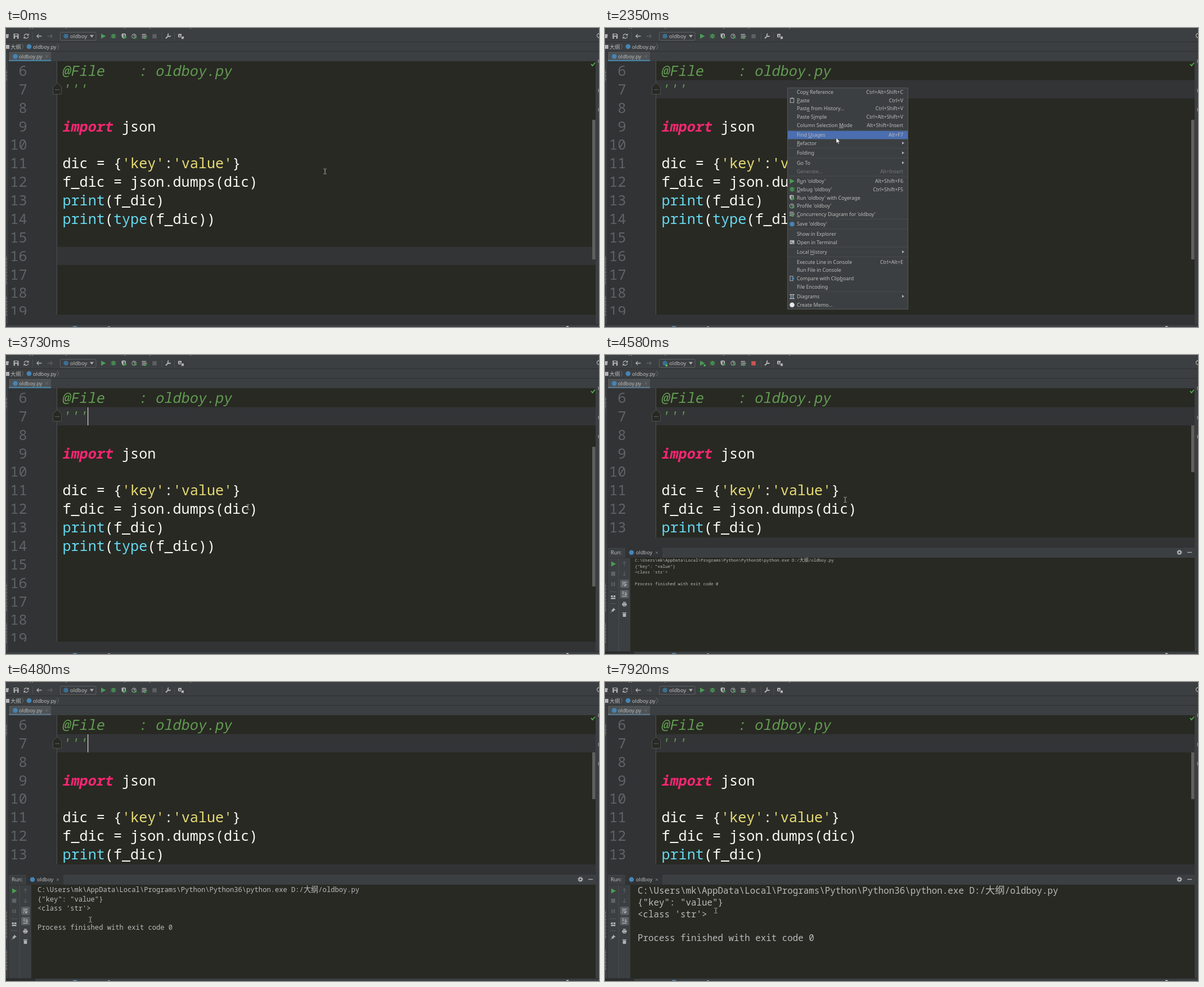
An HTML page for the animation above (8 s loop, 1054x531 px).

```html
<!DOCTYPE html>
<html lang="en">
<head>
<meta charset="utf-8">
<style>
html, body { margin: 0; width: 100%; height: 100%; overflow: hidden; background: #3c3f41; }
svg { display: block; width: 1054px; height: 531px; }
text { white-space: pre; font: 9.2px 'Noto Sans', 'Noto Sans CJK SC', 'Noto Sans CJK', sans-serif; fill: #bbb; }
.code text { font: 25.15px 'Noto Sans Mono', monospace; fill: #f8f8f2; }
.code .num { fill: #606366; }
.code .doc { fill: #629c52; }
.code .key { fill: #f92672; font-weight: bold; }
.code .str { fill: #e6db74; }
.code .fn { fill: #66d9ef; }
.menu text { font-size: 8.9px; }
.menu .off { fill: #777; }
.mnemonic { text-decoration: underline; }
.console text { font-family: 'Noto Sans Mono', 'Noto Sans CJK SC', 'Noto Sans CJK', monospace; }
.cjk { font-size: 1.09em; }
</style>
</head>
<body>
<svg id="stage" viewBox="0 0 1054 531"></svg>
<script>
const LOOP = 8000;
const GREY = '#afb1b3', GREEN = '#499c54', RED = '#c75450', BLUE = '#4584b6';
const PANEL = '#3c3f41', DARK = '#313335', EDITOR = '#282923';

const esc = s => s.replace(/&/g, '&amp;').replace(/</g, '&lt;');
const rect = (x, y, w, h, fill, more = '') =>
  `<rect x="${x}" y="${y}" width="${w}" height="${h}" fill="${fill}" ${more}/>`;
const text = (x, y, s, more = '') => `<text x="${x}" y="${y}" ${more}>${esc(s)}</text>`;
const line = (d, color = GREY, w = 1) => `<path d="${d}" fill="none" stroke="${color}" stroke-width="${w}"/>`;
const fill = (d, color = GREY) => `<path d="${d}" fill="${color}"/>`;
const dot = (x, y, r, color) => `<circle cx="${x}" cy="${y}" r="${r}" fill="${color}"/>`;
const group = (id, body, more = '') => `<g id="${id}" ${more}>${body}</g>`;

// Each icon is drawn around its own centre.
const shapes = {
  play: c => fill('M-4-4.5L4.5 0L-4 4.5Z', c),
  bug: c => `<ellipse rx="2.7" ry="4" fill="${c}"/>` +
    line('M-4.5-3L4.5 3M4.5-3L-4.5 3M-4.5 0H4.5', c) + line('M-2-.8H2M-2 1.4H2', PANEL, .6),
  shield: c => fill('M-4.5-4L-1-5L3-4V0Q2 3-1 4.5Q-4 3-4.5 0Z', c) +
    fill('M-1-3H1V3H-1Z', PANEL) + fill('M0-1L5 2L0 5Z', GREEN),
  clock: c => `<circle cx="-.5" r="3.8" fill="none" stroke="${c}"/>` +
    line('M-.5-3V0L2-1.5', c) + fill('M0 0L5 2.5L0 5Z', GREEN),
  lanes: c => line('M-4.5-3.5H3M-4.5-.5H4.5M-4.5 2.5H0', c, 1.4) + fill('M0 0L5 2.5L0 5Z', GREEN),
  stop: c => rect(-3.7, -3.7, 7.4, 7.4, c),
  pause: c => rect(-3, -3.5, 2, 7, c) + rect(1, -3.5, 2, 7, c),
  save: c => fill('M-4.5-4.5H3L4.5-3V4.5H-4.5Z', c) + rect(-2.5, -3.5, 5, 2.5, PANEL) + rect(-2, 1, 4, 3.5, PANEL),
  sync: c => line('M-3.7-.5A3.8 3.8 0 0 1 3-2.5M3.7.5A3.8 3.8 0 0 1-3 2.5', c, 1.3) +
    fill('M4.5-5V-1H.8ZM-4.5 5V1H-.8Z', c),
  left: c => line('M4.5 0H-4M-.8-3.4L-4.2 0L-.8 3.4', c, 1.3),
  right: c => line('M-4.5 0H4M.8-3.4L4.2 0L.8 3.4', c, 1.3),
  up: c => line('M0 4V-3.5M-3-.5L0-3.7L3-.5', c),
  down: c => line('M0-4V3.5M-3 .5L0 3.7L3 .5', c),
  wrench: c => line('M-4 4L1-1', c, 2.2) + line('M1.2-4.4A2.6 2.6 0 1 0 4.5-.7', c, 1.8),
  cards: c => rect(-5, -4.5, 6, 6, c) + rect(0, -1, 5, 5.5, PANEL) + rect(.8, 0, 4.2, 4.4, c) + rect(-3, -2, 2, 2, PANEL),
  clip: c => rect(-3.2, -3.5, 6.4, 7.5, 'none', `stroke="${c}"`) + rect(-1.6, -4.8, 3.2, 2, c),
  term: c => rect(-4, -3.5, 8, 7, c) + line('M-2.5-1.5L-.8 0L-2.5 1.5M0 2H2.5', PANEL, .9),
  compare: c => rect(-3.5, -4, 5, 8, 'none', `stroke="${c}"`) + line('M4.5 0H0M2-2L0 0L2 2', '#3592c4', 1.3),
  diagram: c => line('M-4.5-3.5H4.5M-4.5 3.5H4.5M-2-3V3M2-3V3', c, 1.3) + line('M-2 0H2', '#3592c4'),
  wrap: c => line('M-4-3H4M-4 0H2.5Q4.5 1.5 2.5 3H0M-4 3H-2M1.5 1.5L0 3L1.5 4.5', c),
  scroll: c => line('M-4 3.7H4M-4-3.5H0M-4-.5H0M2.5-4V1.5M.7 0L2.5 1.7L4.3 0', c),
  printer: c => rect(-4, -1.5, 8, 4, c) + rect(-2.5, -4, 5, 1.8, c) + rect(-2.5, 1, 5, 3, c) + line('M-2 2H2', PANEL, .7),
  trash: c => rect(-2.8, -2, 5.6, 6, c) + rect(-3.6, -4, 7.2, 1.3, c),
  layout: c => rect(-4, -3, 3.5, 3, c) + rect(.5, -3, 3.5, 3, c) + rect(-4, 1, 8, 2.5, c),
  pin: c => fill('M0-4.5L4.5 0L2.5 0L.5 2L0 3.5L-3.5 0L-2-.5L0-2.5Z', c) + line('M-1.5 1.5L-4.5 4.5', c),
  gear: c => `<circle r="2.6" fill="none" stroke="${c}" stroke-width="2"/>` +
    `<circle r="3.9" fill="none" stroke="${c}" stroke-width="1.4" stroke-dasharray="1.6 1.46"/>`,
  disc: c => dot(0, 0, 4.3, c),
  more: c => fill('M-2-2.5L2 0L-2 2.5Z', c),
};
const icon = (name, x, y, color = GREY) => `<g transform="translate(${x} ${y})">${shapes[name](color)}</g>`;

// ---- editor ----
const PITCH = 32.87, CODE_X = 100.4, CODE_ADV = 25.15 * .6;
const rowY = n => 85 + (n - 6) * PITCH;
const source = {
  6: [['doc', '@File    : oldboy.py']],
  7: [['doc', "'''"]],
  9: [['key', 'import'], ['', ' json']],
  11: [['', 'dic = {'], ['str', "'key'"], ['', ':'], ['str', "'value'"], ['', '}']],
  12: [['', 'f_dic = json.dumps(dic)']],
  13: [['fn', 'print'], ['', '(f_dic)']],
  14: [['fn', 'print'], ['', '('], ['fn', 'type'], ['', '(f_dic))']],
};
// Comments and keywords are slanted about the middle of their letters.
function codeLine(n) {
  let x = CODE_X, out = '';
  for (const [kind, s] of source[n] || []) {
    const slanted = kind === 'doc' || kind === 'key';
    out += slanted
      ? text(0, 0, s, `class="${kind}" transform="translate(${x - 1.2} ${rowY(n)}) skewX(-11)"`)
      : text(x, rowY(n), s, `class="${kind}"`);
    x += s.length * CODE_ADV;
  }
  return out;
}
function editor() {
  let out = rect(5, 59, 86, 450, DARK) + rect(91, 59, 957, 450, EDITOR) +
    rect(91, 0, 957, 32.4, '#333436', 'id="current"') + line('M90.5 59V509', '#4d4f50') +
    `<path d="M83.5 117.5V104L91 97.5L98.5 104V117.5Z" fill="${EDITOR}" stroke="#4d4f50"/>` +
    line('M87 109.5H95', '#5c5e60');
  let code = '';
  for (let n = 6; n <= 19; n++)
    code += text(37.5, rowY(n), String(n), 'class="num" text-anchor="end"') + codeLine(n);
  out += group('code', code, 'class="code"') + rect(145, 93, 1.2, 32, '#d8d8d2', 'id="caret"');
  return out + rect(1042, 163, 5.5, 248, '#606060', 'id="thumb"') +
    line('M1040 64L1042.5 67L1047 61.5', '#4fae4f', 1.8);
}

function chrome() {
  let out = rect(0, 0, 1054, 59, PANEL) + rect(0, 59, 5, 472, PANEL) + rect(1048, 42, 6, 489, PANEL) +
    line('M0 24.5H1054M0 41.5H1054M4.5 42V527', '#2d2f30');
  for (const x of [42, 46, 106, 210, 255, 327]) out += rect(x, 0, 2, 1, '#8f9193');
  out += fill('M0 11H5L4 18H0Z') + icon('save', 18, 14.5) + icon('sync', 36, 14.5) +
    icon('left', 59, 14.5) + icon('right', 78, 14.5, '#5c6062') +
    line('M47.5 8V22M277.5 8V22M299.5 8V22', '#4b4e50') +
    rect(96.5, 7.5, 63.5, 14.5, 'none', 'rx="2" stroke="#5e6163"') +
    icon('disc', 106.5, 14.5, '#3c6e91') + text(114, 18.2, 'oldboy', 'style="font-size:9.5px"') +
    fill('M149 12.5H156L152.5 17Z') + icon('play', 173, 14.5, GREEN) + icon('bug', 191, 14.5, GREEN) +
    icon('shield', 210, 14.5) + icon('clock', 228, 14.5) + icon('lanes', 246, 15) +
    icon('stop', 264, 14.7, '#5c6062') + icon('wrench', 288, 14.5) + icon('cards', 311, 15) +
    `<circle cx="1054" cy="13.5" r="3.5" fill="none" stroke="${GREY}" stroke-width="1.3"/>`;
  out += group('busy', icon('stop', 264, 14.7, RED) + dot(109.5, 18.5, 2, '#4fc25d') + dot(177, 18.5, 1.8, '#4fc25d'));
  out += rect(0, 30, 6, 7, GREY) + text(8, 36.8, '大纲') + line('M28 28L31 33L28 38M91 28L94 33L91 38', '#66696b') +
    icon('disc', 41, 33, BLUE) + text(48, 36.8, 'oldboy.py') +
    rect(5, 42, 75, 17, '#4e5254') + rect(5, 56.5, 75, 2.5, '#4a7f9e', 'id="tabline"') +
    icon('disc', 16.5, 50.5, BLUE) + text(23, 54, 'oldboy.py') +
    line('M70.5 48.5L74.5 52.5M74.5 48.5L70.5 52.5', '#777a7c', .8);
  for (const [y, n] of [[75, 7], [406, 17], [476, 12]])
    for (let i = 0; i < n; i++) out += rect(0, y + i * 3, 1 + i % 2 * .7, 1.6, '#8a8c8e');
  for (const y of [56, 108, 142]) out += rect(1052.5, y, 1.5, 6, '#85878a');
  return out;
}

const footer = rect(5, 509, 1043, 18, DARK) + line('M0 526.5H1054', '#2b2d2e') + rect(0, 527, 1054, 4, PANEL) +
  rect(119, 529.5, 7, 1.5, '#5d91b5') + rect(181, 530, 4, 1, GREY) + rect(996, 529.5, 4, 1.5, '#ccc');

// ---- run panel ----
const output = [
  'C:\\Users\\mk\\AppData\\Local\\Programs\\Python\\Python36\\python.exe D:/大纲/oldboy.py',
  '{"key": "value"}', "<class 'str'>", '', 'Process finished with exit code 0'];
const outputRow = s => `<text>${esc(s).replace('大纲', '<tspan class="cjk">$&</tspan>')}</text>`;
const dim = '#606365';
const runPanel = group('run',
  rect(5, 324, 1043, 17, DARK) + rect(5, 341, 1043, 185, PANEL) + line('M5 341.5H1048', '#2d2f30') +
  text(10, 354.3, 'Run:') + rect(36, 342, 66, 18, DARK) + icon('disc', 47, 350.7, BLUE) + text(55, 354.3, 'oldboy') +
  line('M90 349L94 353M94 349L90 353', '#85888a', .8) +
  icon('gear', 1021, 350.5) + line('M1035 350.5H1043', GREY, 1.3) +
  rect(45, 360, 1003, 166, EDITOR) + line('M24.5 360V526', '#4a4d4f') +
  line('M5 360.5H45', '#323435') + line('M9 420.5H20M9 441.5H20', '#55585a') +
  icon('play', 15, 371, GREEN) + icon('stop', 14.5, 388.5, dim) + icon('pause', 14.5, 407, dim) +
  icon('layout', 14.5, 430) + icon('pin', 14.5, 453) +
  icon('up', 34.5, 370.5, dim) + icon('down', 34.5, 388.5, dim) +
  rect(27, 399, 15.5, 15, '#5a5e60', 'rx="2"') + rect(27, 417, 15.5, 15, '#5a5e60', 'rx="2"') +
  icon('wrap', 34.5, 406.5, '#d0d2d3') + icon('scroll', 34.5, 424.5, '#d0d2d3') +
  icon('printer', 34.5, 442.5) + icon('trash', 34.5, 461) +
  group('starting', icon('stop', 14.5, 388.5, RED)) +
  group('console', output.map(outputRow).join(''), 'class="console"') +
  rect(0, 526, 52, 5, '#2b2d2e'));

// ---- context menu: label (the letter after _ is underlined), shortcut, icon, colour; '-' is a separator ----
const ROW = 14.7, GAP = 2.8;
const items = [
  ['Cop_y Reference', 'Ctrl+Alt+Shift+C'], ['_Paste', 'Ctrl+V', 'clip'], ['Past_e from History...', 'Ctrl+Shift+V'],
  ['Paste S_imple', 'Ctrl+Alt+Shift+V'], ['Column Selection _Mode', 'Alt+Shift+Insert'], '-',
  ['Find _Usages', 'Alt+F7'], ['_Refactor', '>'], '-', ['Folding', '>'], '-',
  ['Go To', '>'], ['Generate...', 'Alt+Insert', '', 'off'], '-',
  ["R_un 'oldboy'", 'Alt+Shift+F6', 'play', GREEN], ["_Debug 'oldboy'", 'Ctrl+Shift+F5', 'bug', GREEN],
  ["Run 'oldboy' with Co_verage", '', 'shield'], ["Profile 'oldboy'", '', 'clock'],
  ["_Concurrency Diagram for 'oldboy'", '', 'lanes'], '-', ["Save 'oldboy'", '', 'disc', BLUE], '-',
  ['Show in Explorer', ''], ['Open in Terminal', '', 'term'], '-', ['Local _History', '>'], '-',
  ['Execute Line in Console', 'Ctrl+Alt+E'], ['Run File in Console', ''],
  ['Compare with Clip_board', '', 'compare'], ['File Encoding', ''], '-',
  ['Diagrams', '>', 'diagram'], ['Create Memo...', '', 'disc', '#e8e8e8']];
const hoverRows = [];
function menu() {
  let y = 113.7, out = rect(324.5, 106.3, 214, 393, PANEL, 'stroke="#56595b"') +
    rect(325, 0, 213, ROW, '#4b6eaf', 'id="hover"');
  for (const item of items) {
    if (item === '-') {
      out += line(`M325 ${y - 6}H538`, '#4b4e50', .8);
      y += GAP;
      continue;
    }
    const [label, keys, name, tone] = item, cls = tone === 'off' ? 'class="off"' : '';
    const marked = esc(label).replace(/_(.)/, '<tspan class="mnemonic">$1</tspan>');
    out += `<text x="341" y="${y + 3.2}" ${cls}>${marked}</text>`;
    out += keys === '>' ? icon('more', 530, y - .5) : text(530, y + 3.2, keys, `text-anchor="end" ${cls}`);
    if (name) out += icon(name, 332.5, y, tone);
    if (!cls) hoverRows.push(y);
    y += ROW;
  }
  return group('menu', out, 'class="menu"');
}

const beam = group('beam', line('M-2.5-4.5H-.7M.7-4.5H2.5M0-4V4M-2.5 4.5H-.7M.7 4.5H2.5', '#d0d0cc', .9));
const arrow = group('arrow',
  '<path d="M0 0V9.5L2.2 7.5L3.8 11L5.3 10.3L3.7 7H6.8Z" fill="#fff" stroke="#222" stroke-width=".5"/>');

const stage = document.getElementById('stage');
stage.innerHTML = editor() + chrome() + footer + runPanel + menu() + beam + arrow;
const el = id => document.getElementById(id);
const rows = [...el('console').children];

// ---- motion ----
// Pointer moves: first and last step time, number of steps, end point.
const moves = [
  [150, 960, 7, 399, 115.5], [1230, 1770, 5, 325, 106], [2200, 2350, 2, 411, 195], [2470, 2890, 4, 430, 270],
  [4310, 4580, 3, 427, 257], [4720, 5280, 5, 240, 405], [5430, 5820, 4, 160, 436], [5950, 6360, 4, 150, 422],
  [7250, 7500, 3, 152, 417.5], [7620, 7920, 3, 197, 406]];
function pointer(t) {
  let x = 567, y = 254.7;
  for (const [from, to, n, endX, endY] of moves) {
    if (t < from) break;
    const step = Math.min(n, Math.floor((t - from) / (to - from) * (n - 1) + 1e-6) + 1);
    x += (endX - x) * step / n;
    y += (endY - y) * step / n;
  }
  return [x, y];
}

// Console zoom, as the advance of one character.
function advance(t) {
  if (t < 5950) return 4.5;
  if (t < 6360) return 4.78 + .28 * Math.floor((t - 5950) / 137);
  if (t < 6480) return 6.17;
  return 7.28 + 2.23 * Math.min(8, Math.floor((t - 6480) / 127.5)) / 8;
}
// advance, left, first baseline, line pitch
const zooms = [[4.5, 53, 367, 10.5], [7.28, 56, 372.8, 16.8], [9.51, 58, 375.5, 21]];
function zoomConsole(adv) {
  const [a, b] = adv < 7.28 ? zooms : zooms.slice(1);
  const k = (adv - a[0]) / (b[0] - a[0]);
  const [, x, y, pitch] = a.map((v, i) => v + (b[i] - v) * k);
  rows.forEach((row, i) => {
    row.setAttribute('x', x);
    row.setAttribute('y', y + i * pitch);
    row.style.fontSize = adv / .6 + 'px';
  });
}

const within = (t, ...spans) => spans.some(([a, b]) => t >= a && t < b);
const show = (id, on) => el(id).setAttribute('visibility', on ? 'inherit' : 'hidden');

function draw(t) {
  const [x, y] = pointer(t), running = t >= 3850, inMenu = within(t, [2200, 3730]);
  el('current').setAttribute('y', t < 1635 ? 388.5 : 92.6);
  show('caret', within(t, [1635, 1920], [3730, 3850], [5950, 7770]));
  el('thumb').setAttribute('y', running ? 125 : 163);
  el('thumb').setAttribute('height', running ? 83 : 248);
  el('tabline').setAttribute('fill', running ? '#5b7486' : '#4a7f9e');
  show('busy', within(t, [3850, 4720]));
  show('run', running);
  show('starting', within(t, [3850, 4310]));
  show('console', t >= 4310);
  show('menu', within(t, [1920, 3730]));
  const row = hoverRows.find(r => Math.abs(r - y) <= ROW / 2);
  show('hover', inMenu && row);
  if (row) el('hover').setAttribute('y', row - ROW / 2);
  show('beam', !inMenu);
  show('arrow', inMenu);
  for (const id of ['beam', 'arrow']) el(id).setAttribute('transform', `translate(${x} ${y})`);
  zoomConsole(advance(t));
}

const start = performance.now();
function tick() {
  draw((performance.now() - start) % LOOP);
  requestAnimationFrame(tick);
}
tick();
</script>
</body>
</html>
```
